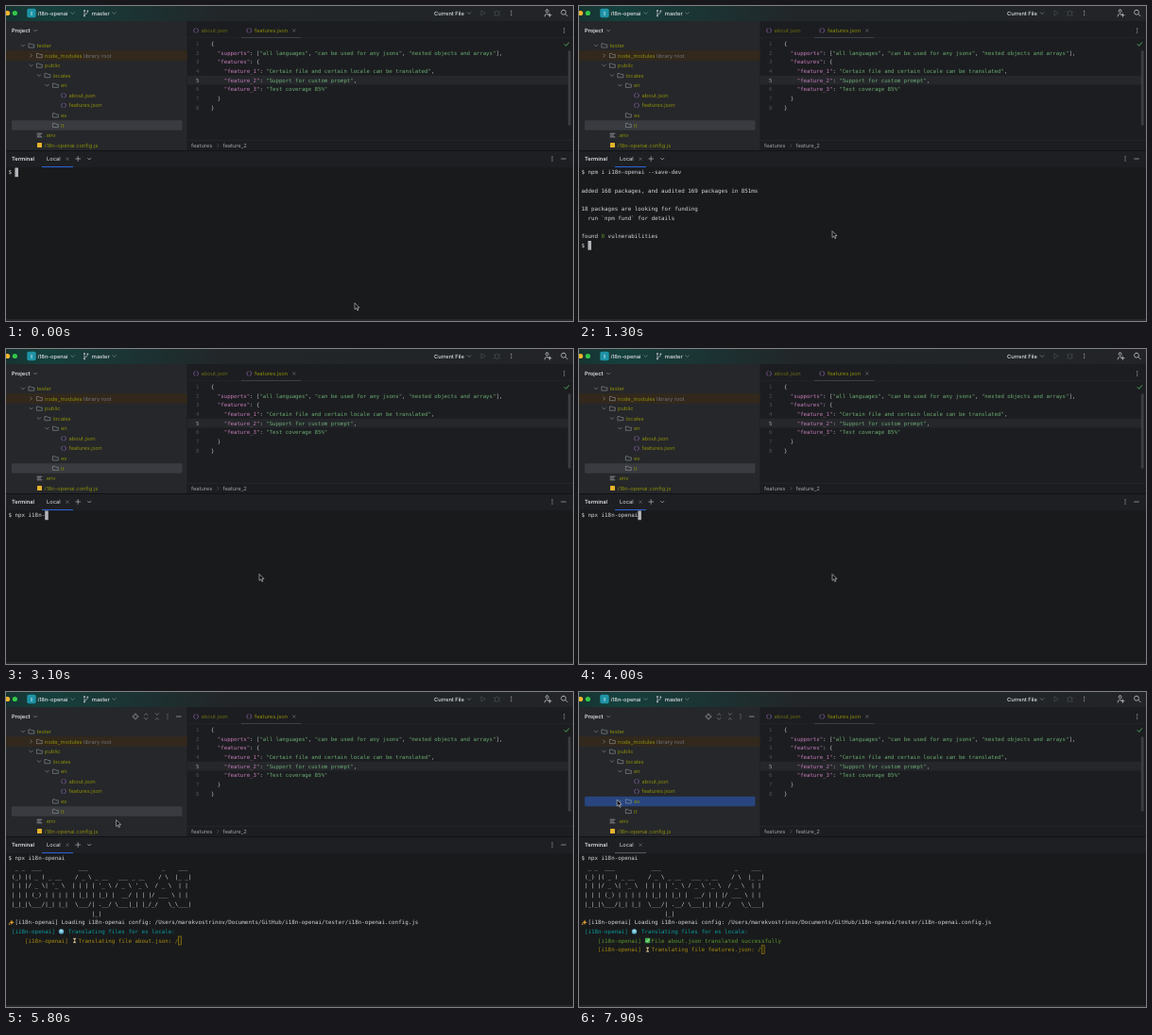
These frames come from a looping animation (600 px wide and 334 px high, 8000 ms). An HTML page:

```html
<!DOCTYPE html>
<html lang="en">
<head>
<meta charset="utf-8">
<title>Terminal session</title>
<style>
  html, body { margin: 0; width: 100%; height: 100%; overflow: hidden; background: #191a1c; }
  svg { display: block; width: 600px; height: 334px; }
  text { font: 5.72px Inter, "Open Sans", sans-serif; white-space: pre; text-rendering: geometricPrecision; }
  .bold { font-weight: 600; }
  .mid { font-weight: 500; }
  .code { font: 5.7px "DejaVu Sans Mono", "Noto Sans Mono", monospace; }
  .term { font: 5.86px "DejaVu Sans Mono", "Noto Sans Mono", monospace; }
  .line { fill: none; stroke-width: .65; stroke-linecap: round; stroke-linejoin: round; }
</style>
</head>
<body>
<svg viewBox="0 0 600 334">
  <defs>
    <linearGradient id="bar">
      <stop offset="0" stop-color="#173331"/>
      <stop offset=".07" stop-color="#15403d"/>
      <stop offset=".38" stop-color="#222629"/>
      <stop offset="1" stop-color="#222427"/>
    </linearGradient>
  </defs>
  <g id="frame"></g>
  <g id="row"></g>
  <g id="tree"></g>
  <g id="panelTools"></g>
  <g id="termTools"></g>
  <g id="term"></g>
  <path id="mouse" d="M0 0V6.9L1.7 5.4 2.8 8 3.9 7.5 2.8 5H5Z" fill="#0b0b0c" stroke="#d8d8d8" stroke-width=".6" stroke-linejoin="round"/>
</svg>
<script>
const LOOP = 8000;
const GREY = '#bcbec4', SOFT = '#8c9096', DIM = '#6f7378', WHITE = '#dfe1e5';
const OLIVE = '#8b8c0a', TEAL = '#0b9a9c', YELLOW = '#a68a0d', GREEN = '#5c962c', PURPLE = '#a771bf';
const $ = id => document.getElementById(id);

// Drawing helpers; text is placed by its vertical middle
const rect = (x, y, w, h, fill, extra = '') =>
  `<rect x="${x}" y="${y}" width="${w}" height="${h}" fill="${fill}" ${extra}/>`;
const text = (x, mid, str, fill = GREY, extra = '') =>
  `<text x="${x}" y="${mid + 2.05}" fill="${fill}" ${extra}>${str}</text>`;
const line = (d, color = GREY, extra = '') =>
  `<path class="line" d="${d}" stroke="${color}" ${extra}/>`;
const dot = (x, y, r, fill) => `<circle cx="${x}" cy="${y}" r="${r}" fill="${fill}"/>`;
const down = (x, y, c = SOFT) => line(`M${x - 1.7} ${y - .9}l1.7 1.7 1.7-1.7`, c);
const right = (x, y, c = SOFT) => line(`M${x - .7} ${y - 1.6}l1.6 1.6-1.6 1.6`, c);
const cross = (x, y, c = SOFT) => line(`M${x - 1.3} ${y - 1.3}l2.6 2.6m0-2.6l-2.6 2.6`, c);
const more = (x, y, c = GREY) => [-2.1, 0, 2.1].map(d => dot(x, y + d, .55, c)).join('');
const minus = (x, y, c = GREY) => line(`M${x - 2.3} ${y}h4.6`, c);
const braces = (x, y) => line(
  `M${x - 1} ${y - 2.2}q-1 0-1 1t-.8 1.2q.8.2.8 1.2t1 1m2-4.4q1 0 1 1t.8 1.2q-.8.2-.8 1.2t-1 1`, '#9168b5');
const folder = (x, y) => line(
  `M${x - 2.7} ${y - 2.1}h2l.9 1h2.6v3.2h-5.5z`, '#9da1a7', 'style="stroke-width:.55"');

function drawTitleBar() {
  return rect(0, 0, 600, 16, 'url(#bar)') +
    dot(1.6, 7.5, 2.6, '#f4b52e') + dot(9.4, 7.5, 2.6, '#33c748') +
    rect(22.3, 2.8, 9.4, 9.4, '#1e93a6', 'rx="1.8"') +
    text(27, 7.5, 'I', '#e8f6f8', 'class="bold" text-anchor="middle"') +
    text(33.5, 7.5, 'i18n-openai', WHITE, 'class="mid"') + down(70.5, 7.7) +
    line('M83 5.5v5M83 9q3.4 0 3.4-3') + dot(83, 5, .9, GREY) + dot(86.4, 5.3, .9, GREY) + dot(83, 10.4, .9, GREY) +
    text(90.8, 7.5, 'master', WHITE, 'class="mid"') + down(114.5, 7.7) +
    text(453, 7.5, 'Current File', WHITE, 'class="mid"') + down(490, 7.7) +
    line('M503.2 5l4 2.5-4 2.5z', '#4b4f54') +
    line('M517.6 7a1.9 1.9 0 013.8 0v1.5a1.9 1.9 0 01-3.8 0zM516.2 6l1.4.7m3.8 0l1.4-.7M516.2 10l1.4-.8m3.8 0l1.4.8', '#4b4f54') +
    more(534.7, 7.5) +
    line('M572.6 3.8a1.5 1.5 0 110 3 1.5 1.5 0 010-3M570 11q0-2.6 2.6-2.6 1 0 1.6.4M575.4 8v3.4m-1.7-1.7h3.4', WHITE) +
    line('M590 4.2a2.5 2.5 0 110 5 2.5 2.5 0 010-5M592 8.6l2.2 2.2', WHITE);
}

const json = [
  '{',
  '  "supports": ["all languages", "can be used for any jsons", "nested objects and arrays"],',
  '  "features": {',
  '    "feature_1": "Certain file and certain locale can be translated",',
  '    "feature_2": "Support for custom prompt",',
  '    "feature_3": "Test coverage 85%"',
  '  }',
  '}'
];
const paint = src => src.replace(/"[^"]*"(:?)/g, (s, colon) =>
  colon ? `<tspan fill="#c77dbb">${s.slice(0, -1)}</tspan>:` : `<tspan fill="#6aab73">${s}</tspan>`);

function drawEditor() {
  const code = json.map((src, i) => {
    const y = 39.8 + i * 9.68;
    return text(204.5, y, i + 1, i === 4 ? '#a1a3ab' : '#4b5059', 'class="code" text-anchor="end"') +
      text(217, y, paint(src), GREY, 'class="code"');
  }).join('');
  return rect(192, 16, 408, 137, '#1c1d20') +
    rect(192, 33.6, 408, .5, '#2a2c30') +
    braces(201, 26) + text(206.5, 26, 'about.json', '#6a6b12') +
    braces(257.3, 26) + text(263, 26, 'features.json', OLIVE) + cross(304.8, 26, DIM) +
    rect(249, 33, 63, 1, '#3a3f49') + more(590.7, 26) +
    rect(192, 73.8, 403, 9.7, '#25272b') + code +
    line('M591 40.6l1.6 1.7 3-3.6', '#4fa35a', 'style="stroke-width:1"') +
    rect(594.8, 47.5, 2.8, 79, '#3b3d41') +
    rect(192, 142, 408, .5, '#2a2c30') +
    text(196, 147.7, 'features', '#9da0a6') + right(224.3, 147.8, '#55585d') +
    text(229.5, 147.7, 'feature_2', '#9da0a6');
}

function drawFrame() {
  return drawTitleBar() +
    rect(0, 16, 192, 137, '#25272a') + rect(191.6, 16, .6, 137, '#18191b') +
    text(6, 26, 'Project', WHITE, 'class="bold"') + down(31.2, 26.2) +
    rect(0, 47.3, 191.6, 10.5, '#33281c') +
    drawEditor() +
    rect(0, 153, 600, 1, '#111214') +
    rect(0, 154, 600, 17, '#1e1f22') + rect(0, 171, 600, 163, '#191a1c') +
    text(6, 162, 'Terminal', WHITE, 'class="bold"') +
    text(43, 162, 'Local', WHITE) + cross(65, 162.2, DIM) +
    rect(0, 332, 600, 2, '#26282b');
}

// Tree entries: depth, arrow, icon, label
const entries = [
  [0, down, folder, 'tester'],
  [1, right, folder, 'node_modules'],
  [1, down, folder, 'public'],
  [2, down, folder, 'locales'],
  [3, down, folder, 'en'],
  [4, null, braces, 'about.json'],
  [4, null, braces, 'features.json'],
  [3, null, folder, 'es'],
  [3, null, folder, 'lt'],
  [1, null, (x, y) => line(`M${x - 2.4} ${y - 1.8}h4.8m-4.8 1.8h3.4m-3.4 1.8h4.8`), '.env'],
  [1, null, (x, y) => rect(x - 2.5, y - 2.5, 5, 5, '#e5b32c', 'rx=".6"'), 'i18n-openai.config.js']
];
const rowY = i => 42 + i * 10.56;

const drawTree = () => entries.map(([depth, arrow, icon, label], i) => {
  const y = rowY(i), x = 27 + depth * 8.5;
  return (arrow ? arrow(x - 9, y) : '') + icon(x, y) + text(x + 5.5, y, label, OLIVE);
}).join('') + text(82, rowY(1), 'library root', DIM);

function drawRow(t) {
  const [i, fill] = t < 6300 ? [8, '#393b40'] : t < 6900 ? [7, '#393b40'] : [7, '#28457f'];
  const box = rect(6, rowY(i) - 5.28, 180.5, 10.56, fill, 'rx="1.4"');
  return t < 7100 ? box : box + right(43.5, rowY(7));
}

const panelTools =
  line('M137 23.6a2.4 2.4 0 110 4.8 2.4 2.4 0 010-4.8M137 22.8v1.8m0 2.8v1.8M133.8 26h1.8m2.8 0h1.8', SOFT) +
  line('M146.5 24.5l1.7-1.7 1.7 1.7M146.5 27.5l1.7 1.7 1.7-1.7', SOFT) +
  line('M158.1 22.7l1.7 1.7 1.7-1.7M158.1 29.3l1.7-1.7 1.7 1.7', SOFT) +
  more(171, 26, SOFT) + minus(182.8, 26);

const termTools = focused => rect(38, 170, 33, 1.1, focused ? '#2c62d2' : '#55585d') + (focused
  ? line('M73.8 162h4.8m-2.4-2.4v4.8') + down(88.2, 162.2, GREY) + more(578, 162) + minus(590, 162)
  : '');

// Terminal grid
const CELL = 3.528, ROW = 9.68;
const cx = col => 2.4 + col * CELL;
const cy = row => 176.4 + row * ROW;
const put = (row, col, str, fill = '#d2d4d8') => text(cx(col), cy(row), str, fill, 'class="term"');
const block = (row, col, n, fill) => rect(cx(col), cy(row) - 4.84, n * CELL, ROW, fill);
const caret = (row, col) => block(row, col, 1, '#b4b6bb');
const hollowCaret = (row, col) =>
  rect(cx(col) + .3, cy(row) - 4.5, CELL - .6, ROW - .7, '#2b2614', `stroke="${YELLOW}" stroke-width=".6"`);

const banner = String.raw`
 _ _  ___           ___                      _    ___
(_) |( _ ) _ __    / _ \ _ __   ___ _ __    / \  |_ _|
| | |/ _ \| '_ \  | | | | '_ \ / _ \ '_ \  / _ \  | |
| | | (_) | | | | | |_| | |_) |  __/ | | |/ ___ \ | |
|_|_|\___/|_| |_|  \___/| .__/ \___|_| |_/_/   \_\___|
                        |_|`.split('\n').slice(1);

const sparkle = (row, col) => {
  const x = cx(col) + 3, y = cy(row);
  return `<path d="M${x + .6} ${y - 2.7}l.8 2 2 .8-2 .8-.8 2-.8-2-2-.8 2-.8zM${x - 1.7} ${y + .6}l.4.9.9.4-.9.4-.4.9-.4-.9-.9-.4.9-.4z" fill="#e0a030"/>`;
};
const globe = (row, col) => dot(cx(col) + 3.2, cy(row), 2.7, '#62b4cf') +
  `<path d="M${cx(col) + 1.6} ${cy(row) - 1.4}l1.8-.5 1.4 1.4-1.8 1.6z" fill="#b9e2ea"/>`;
const hourglass = (row, col) => {
  const x = cx(col) + 3.2, y = cy(row);
  return `<path d="M${x - 1.4} ${y - 2.4}h2.8L${x} ${y}l1.4 2.4h-2.8L${x} ${y}z" fill="#d9c9a0" stroke="#b9a26b" stroke-width=".4"/>`;
};
const tick = (row, col) => rect(cx(col) + .5, cy(row) - 2.7, 5.4, 5.4, '#3fae49', 'rx=".9"') +
  line(`M${cx(col) + 1.8} ${cy(row)}l1.1 1.2 1.9-2.5`, '#fff');

const TAG = '[i18n-openai]';

// Linear keyframes: [time, ...values]
function ramp(t, keys) {
  if (t <= keys[0][0]) return keys[0].slice(1);
  for (let i = 1; i < keys.length; i++) {
    const [t0, ...a] = keys[i - 1], [t1, ...b] = keys[i];
    if (t < t1) return a.map((v, k) => v + (b[k] - v) * (t - t0) / (t1 - t0));
  }
  return keys[keys.length - 1].slice(1);
}

function prompt(row, command, t, keys) {
  const typed = command.slice(0, Math.floor(ramp(t, keys)[0]));
  return put(row, 0, '$ ' + typed) + caret(row, 2 + typed.length);
}

const INSTALL = 'npm i i18n-openai --save-dev';
const RUN = 'npx i18n-openai';

function progress(t) {
  const spin = '⠋⠙⠹⠸⠼⠴⠦⠧⠇⠏'[Math.floor(t / 100 + 9) % 10];
  return put(1, 0, '(') + block(1, 1, 9, '#e9eaec') + block(1, 10, 9, '#3c3e41') + put(1, 19, ')') +
    put(1, 21, spin) + put(1, 23, 'idealTree:istanbul-lib-report:') +
    block(1, 54, 4, '#b4b6bb') + put(1, 54, 'sill', '#191a1c') +
    put(1, 59, 'placeDep', PURPLE) +
    put(1, 68, 'ROOT make-dir@3.1.0 OK for: nyc@15.1.0 want: ^3.0.0');
}

function summary(t) {
  return put(2, 0, 'added 168 packages, and audited 169 packages in 851ms') +
    put(4, 0, '18 packages are looking for funding') +
    put(5, 0, '  run `npm fund` for details') +
    put(7, 0, 'found ') + put(7, 6, '0', GREEN) + put(7, 8, 'vulnerabilities') +
    prompt(8, 'clear', t, [[1450, 0], [1700, 5]]);
}

function waiting(row, file, turns) {
  const label = `Translating file ${file}: ` + '|/-\\'[Math.floor(turns) % 4];
  return put(row, 5, TAG, YELLOW) + hourglass(row, 19) + put(row, 21, label, YELLOW) +
    hollowCaret(row, 21 + label.length);
}

function translation(t) {
  const head = banner.map((s, i) => put(i + 1, 1, s)).join('') +
    sparkle(7, 0) + put(7, 2, TAG + ' Loading i18n-openai config: ' +
      '/Users/marekvostrinov/Documents/GitHub/i18n-openai/tester/i18n-openai.config.js') +
    put(8, 1, TAG, TEAL) + globe(8, 15) + put(8, 18, 'Translating files for es locale:', TEAL);
  if (t < 7100) return head + waiting(9, 'about.json', (t - 4700) / 59 + 3.2);
  return head + put(9, 5, TAG, GREEN) + tick(9, 19) +
    put(9, 21, 'File about.json translated successfully', GREEN) +
    waiting(10, 'features.json', (t - 7100) / 59);
}

function drawTerm(t) {
  if (t < 750) return prompt(0, INSTALL, t, [[100, 0], [680, INSTALL.length]]);
  if (t < 1200) return put(0, 0, '$ ' + INSTALL) + progress(t);
  if (t < 1800) return put(0, 0, '$ ' + INSTALL) + summary(t);
  if (t < 4200) return prompt(0, RUN, t, [[1950, 0], [2700, 7], [3080, 9], [3700, RUN.length]]);
  return put(0, 0, '$ ' + RUN) + (t < 4700 ? caret(1, 0) : translation(t));
}

const path = [
  [100, 369, 314.8], [800, 268, 238.6], [4800, 268, 238.6], [5500, 160, 150],
  [6200, 59, 116.6], [7200, 59, 116.6], [7650, 40.2, 114.2]
];

const shown = {};
function set(id, markup) {
  if (shown[id] !== markup) $(id).innerHTML = shown[id] = markup;
}

function render(t) {
  set('row', drawRow(t));
  set('panelTools', t < 5600 ? '' : panelTools);
  set('termTools', termTools(t < 6900));
  set('term', drawTerm(t));
  const [x, y] = ramp(t, path);
  $('mouse').setAttribute('transform', `translate(${x} ${y})`);
}

set('frame', drawFrame());
set('tree', drawTree());

const start = performance.now();
function play() {
  render((performance.now() - start) % LOOP);
  requestAnimationFrame(play);
}
play();
</script>
</body>
</html>
```
